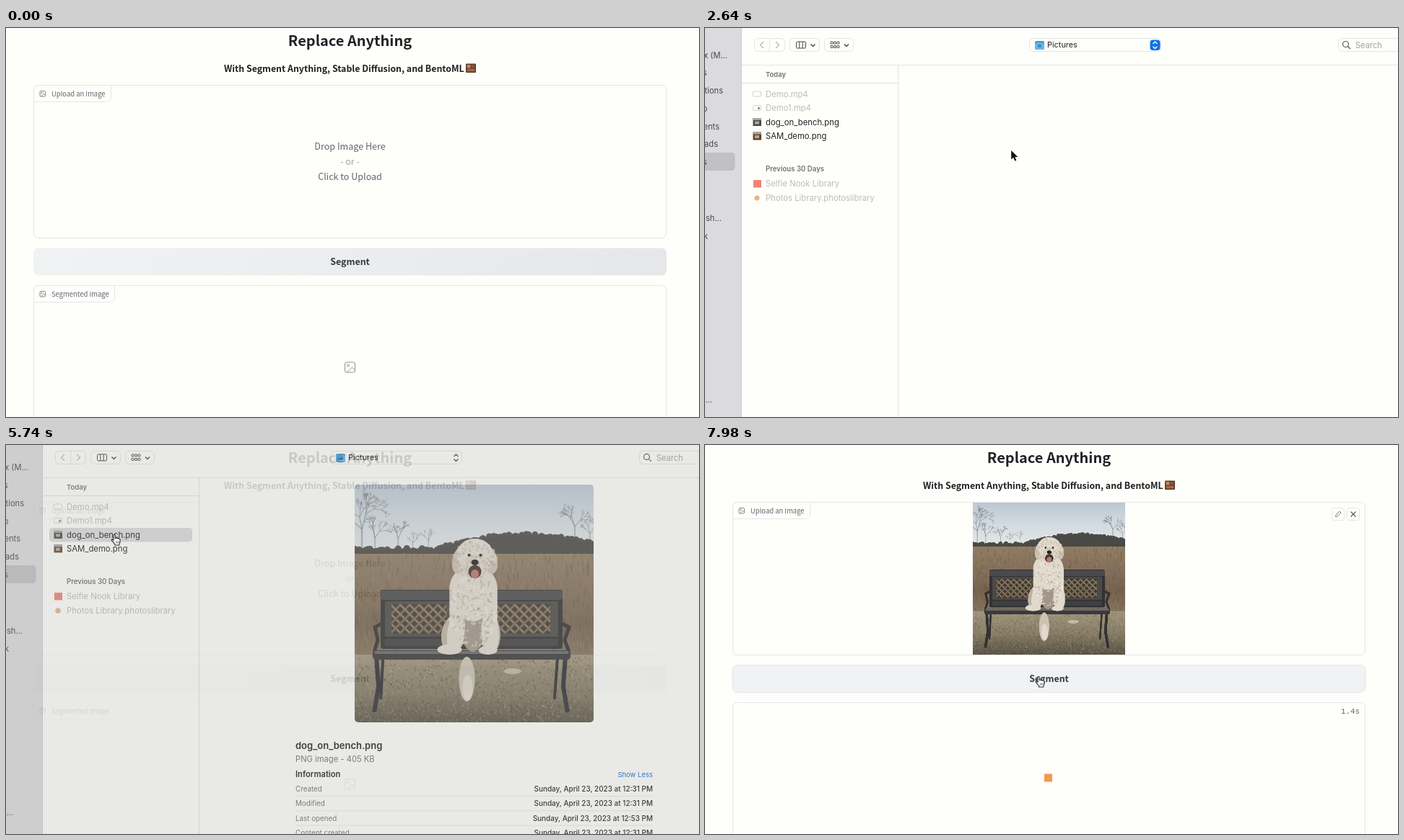
An HTML page with a canvas that plays this animation: 960 by 540 pixels, repeating every 8 s.

```html
<!DOCTYPE html>
<html lang="en">
<head>
<meta charset="utf-8">
<title>Replace Anything</title>
<style>
html, body { margin: 0; width: 100%; height: 100%; overflow: hidden; background: #fefefb; }
canvas { display: block; width: 960px; height: 540px; }
</style>
</head>
<body>
<canvas id="stage" width="960" height="540"></canvas>
<script>
const LOOP = 8000;
const BG = '#fefefb', INK = '#202226', MID = '#62666e', PALE = '#bcbcc0', LINE = '#e5e6e9', DARK = '#44464a';
const PAGE_FONT = '"Noto Sans CJK JP", "Noto Sans CJK SC", "Noto Sans CJK", "Noto Sans", sans-serif';
const UI_FONT = 'Inter, sans-serif';

const makeCanvas = (w, h) => Object.assign(document.createElement('canvas'), { width: w, height: h });
const stage = document.getElementById('stage').getContext('2d');
const layer = makeCanvas(960, 540);
const layerCtx = layer.getContext('2d');
let g = stage;

const clamp = v => Math.min(1, Math.max(0, v));
const ramp = (t, a, b) => clamp((t - a) / (b - a));
const ease = u => u * u * (3 - 2 * u);

function rect(x, y, w, h, color) {
  g.fillStyle = color;
  g.fillRect(x, y, w, h);
}

function box(x, y, w, h, r, fill, stroke) {
  g.beginPath();
  g.roundRect(x, y, w, h, r);
  if (fill) { g.fillStyle = fill; g.fill(); }
  if (stroke) { g.strokeStyle = stroke; g.lineWidth = 1; g.stroke(); }
}

function oval(x, y, rx, ry, color, turn = 0) {
  g.beginPath();
  g.ellipse(x, y, rx, ry, turn, 0, 7);
  g.fillStyle = color;
  g.fill();
}

function line(points, color, width = 1) {
  g.beginPath();
  for (let i = 0; i < points.length; i += 2) g.lineTo(points[i], points[i + 1]);
  g.strokeStyle = color;
  g.lineWidth = width;
  g.stroke();
}

// y is the middle of the capitals
function text(s, x, y, size, color, { align = 'left', weight = 400, font = UI_FONT } = {}) {
  g.font = `${weight} ${size}px ${font}`;
  g.textAlign = align;
  g.fillStyle = color;
  g.fillText(s, x, y + size * 0.365);
}

const label = (s, x, y, size, color, align = 'left', weight = 400) =>
  text(s, x, y, size, color, { align, weight, font: PAGE_FONT });

function gradient(x0, y0, x1, y1, ...colors) {
  const grad = g.createLinearGradient(x0, y0, x1, y1);
  colors.forEach((c, i) => grad.addColorStop(i / (colors.length - 1), c));
  return grad;
}

function seeded(seed) {
  return () => (seed = (seed * 16807) % 2147483647) / 2147483647;
}

/* ---------- photo ---------- */

function tree(x, y, angle, len, rnd) {
  if (len < 3) return;
  const x2 = x + Math.sin(angle) * len, y2 = y - Math.cos(angle) * len;
  line([x, y, x2, y2], 'rgba(92,92,90,.4)', len / 14 + 0.3);
  for (let i = -1; i <= 1; i++) tree(x2, y2, angle + i * 0.5 + (rnd() - 0.5) * 0.7, len * (0.55 + rnd() * 0.2), rnd);
}

function blades(n, top, height, tall, lean, colors, rnd) {
  for (let i = 0; i < n; i++) {
    const x = rnd() * 330, y = top + rnd() * height;
    line([x, y, x + (rnd() - 0.5) * lean, y - tall], colors[rnd() * colors.length | 0], 0.9);
  }
}

function lattice(x, y, w, h) {
  rect(x, y, w, h, '#3f3a34');
  g.save();
  g.beginPath();
  g.rect(x, y, w, h);
  g.clip();
  for (let i = -h; i < w + h; i += 13) {
    line([x + i, y, x + i + h, y + h], '#8b7860', 3);
    line([x + i + h, y, x + i, y + h], '#7a6852', 3);
  }
  g.restore();
}

function bench() {
  const dark = '#323234', wood = '#4a4a4c';
  line([30, 240, 33, 280, 27, 316], dark, 6);
  line([291, 240, 288, 280, 294, 316], dark, 6);
  line([39, 242, 36, 298], dark, 4);
  line([280, 242, 276, 298], dark, 4);
  box(36, 146, 251, 82, 3, dark);
  box(36, 147, 251, 13, 3, wood);
  rect(42, 162, 239, 49, '#4c4a47');
  lattice(51, 166, 76, 41);
  lattice(196, 166, 74, 41);
  rect(42, 214, 239, 10, '#404042');
  line([39, 192, 28, 198, 32, 216, 27, 232], dark, 5);
  line([284, 192, 296, 198, 290, 216, 296, 232], dark, 5);
  box(25, 230, 273, 13, 4, '#3a3a3c');
  rect(28, 231, 267, 4, '#68686a');
}

function dog(rnd) {
  const fur = '#e0d9cc', shade = '#bdb2a2';
  oval(155, 270, 11, 31, '#cdc4b4');
  oval(156, 282, 7, 18, fur);
  oval(137, 207, 17, 27, shade, 0.2);
  oval(186, 205, 15, 29, shade, -0.1);
  box(131, 112, 66, 112, 32, fur);
  oval(163, 190, 18, 42, '#a2978a');
  oval(163, 150, 28, 40, fur);
  oval(140, 205, 12, 29, fur, 0.15);
  oval(187, 205, 12, 29, fur, -0.08);
  oval(131, 229, 17, 7, fur);
  oval(184, 230, 13, 6, fur);
  oval(145, 105, 10, 19, '#cbc1b1', 0.2);
  oval(187, 105, 10, 19, '#cbc1b1', -0.2);
  oval(166, 97, 25, 22, fur);
  oval(166, 114, 18, 17, '#d8cfc1');
  for (let i = 0; i < 420; i++) {
    const a = rnd() * 7, r = Math.sqrt(rnd());
    const onHead = i % 4 === 0;
    const x = onHead ? 166 + Math.cos(a) * r * 30 : 163 + Math.cos(a) * r * 34;
    const y = onHead ? 101 + Math.sin(a) * r * 24 : 172 + Math.sin(a) * r * 54;
    oval(x, y, 2.4, 1.2, rnd() < 0.45 ? 'rgba(150,138,122,.3)' : 'rgba(242,238,228,.45)', rnd() * 3);
  }
  oval(158, 98, 2.2, 2, '#37302a');
  oval(174, 98, 2.2, 2, '#37302a');
  oval(166, 121, 9, 9, '#46342e');
  oval(166, 124, 5.5, 6, '#b8776e');
  oval(166, 108, 5, 4, '#222022');
}

function makePhoto() {
  const c = makeCanvas(660, 660), rnd = seeded(77);
  g = c.getContext('2d');
  g.scale(2, 2);
  rect(0, 0, 330, 110, gradient(0, 0, 0, 100, '#bcc8d2', '#d3dce2', '#e6e9e8'));
  [[10, 92, 30], [28, 92, 18], [102, 90, 12], [60, 92, 16], [80, 92, 11], [304, 78, 20], [325, 82, 14]]
    .forEach(([x, y, s]) => tree(x, y, 0, s, rnd));
  const ridge = x => 90 - 20 * Math.sin(clamp((x - 110) / 250) * Math.PI);
  for (let x = 0; x < 330; x += 3) oval(x, ridge(x) + rnd() * 5, 5, 6, '#4e4d48');
  g.beginPath();
  g.moveTo(0, 106);
  for (let x = 0; x <= 330; x += 10) g.lineTo(x, ridge(x));
  g.lineTo(330, 106);
  g.fillStyle = '#4a4945';
  g.fill();
  rect(0, 96, 330, 150, gradient(0, 96, 0, 240, '#8f7d64', '#84705a', '#75624e', '#85745c'));
  blades(800, 102, 137, 9, 4, ['rgba(72,56,42,.3)', 'rgba(174,150,120,.3)'], rnd);
  rect(0, 236, 330, 94, gradient(0, 236, 0, 330, '#a0957c', '#897f68', '#5b5446'));
  blades(1100, 238, 94, 3, 8, ['rgba(56,50,40,.4)', 'rgba(200,188,160,.4)'], rnd);
  oval(218, 259, 12, 4, '#c4b9a2');
  bench();
  dog(rnd);
  return c;
}
const photo = makePhoto();

/* ---------- web page ---------- */

function imageIcon(x, y, s, color) {
  box(x, y, s, s, s * 0.15, null, color);
  g.beginPath();
  g.arc(x + s * 0.32, y + s * 0.32, s * 0.11, 0, 7);
  g.stroke();
  line([x + s * 0.2, y + s, x + s * 0.7, y + s * 0.5, x + s, y + s * 0.76], color);
}

function tab(y, w, s) {
  box(38.5, y, w, 23, [6, 0, 6, 0], BG, LINE);
  imageIcon(47, y + 8, 7.5, '#84888f');
  label(s, 63, y + 11.8, 9.45, MID);
}

function bento() {
  box(637, 49.5, 14, 12.5, 1, '#56392a');
  rect(638.5, 51, 5, 4.5, '#c08a5c');
  rect(644.5, 51, 5, 4.5, '#84583a');
  rect(638.5, 56.5, 11, 4, '#9a6a42');
  oval(646.5, 58.5, 1.5, 1.3, '#d45a3c');
}

function page(t) {
  const loaded = t >= 6040, hover = t >= 7080, started = 7280;
  rect(0, 0, 960, 540, BG);
  label('Replace Anything', 476.5, 18, 20, INK, 'center', 600);
  label('With Segment Anything, Stable Diffusion, and BentoML', 302, 56, 12.35, INK, 'left', 600);
  bento();

  box(38.5, 79.5, 876, 212, 6, null, LINE);
  if (loaded) {
    g.drawImage(photo, 371, 80, 210.5, 210.5);
    box(868.5, 87.5, 17, 17, 3, BG, LINE);
    box(889.5, 87.5, 17, 17, 3, BG, LINE);
    line([873.5, 99.5, 874, 97, 879, 92, 881, 94, 876, 99, 873.5, 99.5], '#6f737a', 0.9);
    line([894.5, 92.5, 901.5, 99.5], '#54575d', 1.1);
    line([901.5, 92.5, 894.5, 99.5], '#54575d', 1.1);
  } else {
    label('Drop Image Here', 476.5, 164, 12.55, MID, 'center');
    label('- or -', 476.5, 185.5, 12.55, '#a0a4ab', 'center');
    label('Click to Upload', 476.5, 206.5, 12.55, MID, 'center');
  }
  tab(79.5, 107, 'Upload an Image');

  const fill = hover ? '#f1f2f3' : gradient(38, 305, 915, 343, '#f1f2f3', '#e5e7ea');
  box(38, 305.5, 877, 38, 7, fill, hover ? LINE : null);
  label('Segment', 476.5, 324, 12.45, '#363a42', 'center', 600);

  box(38.5, 357.5, 876, 220, 6, null, LINE);
  if (t < started) {
    tab(357.5, 112, 'Segmented Image');
    imageIcon(469.5, 464, 14, '#8e9299');
  } else {
    const secs = ((t - started) / 500).toFixed(1) + 's';
    text(secs, 907, 368.8, 10.8, MID, { align: 'right', font: '"Liberation Mono", monospace' });
    rect(470, 456.5, 11, 11, '#f09a4c');
  }
}

/* ---------- file dialog ---------- */

function chevron(x, y, w, h) {
  line([x - w, y - h, x, y, x + w, y - h], DARK, 1.4);
}

function toolbar(active) {
  const rim = '#e4e4e6';
  box(68.5, 14.5, 42, 18, 5, null, rim);
  line([89.5, 15, 89.5, 32], rim);
  line([81, 19, 76.5, 23.5, 81, 28], '#b4b4b8', 1.2);
  line([98, 19, 102.5, 23.5, 98, 28], '#b4b4b8', 1.2);
  box(117.5, 14.5, 41, 18, 5, null, rim);
  box(126.5, 19, 13, 9, 1.5, null, DARK);
  line([130.8, 19, 130.8, 28], DARK);
  line([135.2, 19, 135.2, 28], DARK);
  chevron(149.5, 25.5, 3, 3);
  box(165.5, 14.5, 40, 18, 5, null, rim);
  for (let i = 0; i < 3; i++) {
    for (let j = 0; j < 2; j++) box(174 + i * 4.5, 19 + j * 5.5, 3, 3, 0.5, null, DARK);
  }
  chevron(196, 25.5, 3, 3);

  box(449.5, 14.5, 182, 18, 5, null, rim);
  box(457, 18, 13, 12, 2, '#3f9bd4');
  box(457, 20.5, 13, 9.5, 2, '#62b8ea');
  box(461, 23, 5, 4, 1, '#3a8cc0');
  text('Pictures', 474, 23.5, 10.9, INK);
  if (active) box(616.5, 16.5, 14, 14.5, 4, '#0f72e6');
  const arrow = active ? '#ffffff' : DARK;
  line([620.5, 22, 623.5, 19, 626.5, 22], arrow, 1.4);
  line([620.5, 25.5, 623.5, 28.5, 626.5, 25.5], arrow, 1.4);

  box(877.5, 14.5, 110, 18, 5, null, rim);
  g.beginPath();
  g.arc(887.5, 22.5, 4, 0, 7);
  g.strokeStyle = '#55575b';
  g.lineWidth = 1.2;
  g.stroke();
  line([890.5, 25.5, 894, 29], '#55575b', 1.3);
  text('Search', 901, 24, 11.1, '#a0a0a5');
}

function sidebar() {
  rect(0, 0, 51, 546, '#dbdbdd');
  line([50.5, 0, 50.5, 546], '#cbcbce');
  box(-10, 173, 51.5, 25, 5, '#c1c1c4');
  [['x (M...', 31, 37.5], ['s', 2.5, 62], ['tions', 25, 87], ['o', 3.5, 112], ['ents', 20, 136.5], ['oads', 18, 161],
    ['s', 2.5, 186], ['osh...', 23, 264], ['k', 4, 289], ['...', 10, 516]]
    .forEach(([s, x, y]) => text(s, x, y, 11.1, '#48484c', { align: 'right' }));
}

function thumb(y, color) {
  rect(66.5, y - 5.5, 11.5, 11, color);
  rect(66.5, y - 5.5, 11.5, 3, '#a4a6a6');
  rect(69, y - 1, 6, 4, '#b8a48c');
}

function fileList(selected, active) {
  line([51, 76.5, 267, 76.5], '#e0e0e2');
  line([267.5, 52, 267.5, 546], '#e2e2e4');
  text('Today', 84, 64.5, 9.5, '#727276', { weight: 600 });
  text('Previous 30 Days', 84, 195.5, 9.65, '#727276', { weight: 600 });
  if (selected) box(60, 121, 198, 19.5, 4.5, active ? '#0a58d2' : '#dadadc');
  box(66.5, 88, 11, 7, 1, null, '#d4d4d8');
  box(66.5, 107.5, 11, 7, 1, null, '#d4d4d8');
  rect(73, 110, 3, 3, '#96969a');
  thumb(130.5, '#4a4a44');
  thumb(150, '#644430');
  rect(67, 211, 11, 10.5, '#ee8478');
  oval(72, 236, 3.6, 3.6, '#e8b488');
  const rows = [['Demo.mp4', 91.5, PALE], ['Demo1.mp4', 111, PALE],
    ['dog_on_bench.png', 130.5, selected && active ? '#ffffff' : INK], ['SAM_demo.png', 150, INK],
    ['Selfie Nook Library', 216, PALE], ['Photos Library.photoslibrary', 236, PALE]];
  rows.forEach(([s, y, color]) => text(s, 84, y, 11.3, color));
}

function preview() {
  g.save();
  g.beginPath();
  g.roundRect(483, 61, 331, 330, 5);
  g.clip();
  g.drawImage(photo, 483, 61, 331, 330);
  g.restore();
  text('dog_on_bench.png', 401, 423.5, 13, INK, { weight: 600 });
  text('PNG image - 405 KB', 401, 442, 11.2, '#727276');
  text('Information', 401, 463, 11.2, INK, { weight: 600 });
  text('Show Less', 896, 463.5, 9.5, '#1a6cc8', { align: 'right' });
  const day = 'Sunday, April 23, 2023 at ';
  [['Created', '12:31 PM'], ['Modified', '12:31 PM'], ['Last opened', '12:53 PM'], ['Content created', '12:31 PM']]
    .forEach(([name, hour], i) => {
      const y = 483.5 + i * 20.3;
      text(name, 401, y, 9.8, '#727276');
      text(day + hour, 896, y, 9.95, INK, { align: 'right', weight: 500 });
      line([401, y + 10, 896, y + 10], '#e8e8ea');
    });
}

function dialog(t, dy) {
  const active = t < 5640;
  rect(0, 0, 960, 540, BG);
  g.save();
  g.translate(0, dy);
  toolbar(active);
  line([51, 51.5, 960, 51.5], '#e4e4e6');
  sidebar();
  fileList(t >= 3640, active);
  if (t >= 3720) preview();
  g.restore();
}

/* ---------- pointer ---------- */

const hand = new Path2D('M4 9V2.2Q4 .8 5.1 .8T6.3 2.2V6Q7.5 5 8.6 6.2Q9.8 5.4 10.8 6.6Q12 6 13 7.4V10.5Q13 13 11.8 14.2V15.5H5.8V14.2Q3.5 11.5 1.6 9.2Q.8 7.6 2.2 7.4Q3.2 7.6 4 9Z');
const arrow = new Path2D('M0 0V12.4L2.9 9.8L5 14.6L7.1 13.7L5.1 9H9Z');

// start, end, target x, target y, bend
const moves = [
  [300, 900, 479, 166.5, 0],
  [2440, 3220, 147, 131, 34],
  [3340, 3500, 150, 124.5, 0],
  [6620, 7160, 462, 321.5, 0]
];

function pointerAt(t) {
  let x = 560, y = 570;
  for (const [a, b, tx, ty, bend] of moves) {
    const s = ease(ramp(t, a, b));
    x += (tx - x) * s;
    y += (ty - y) * s + 2 * s * (1 - s) * bend;
  }
  return [x, y];
}

function pointer(t) {
  const [x, y] = pointerAt(t);
  const isArrow = t > 1860 && t < 5660;
  g.save();
  g.lineJoin = 'round';
  if (isArrow) {
    g.translate(x, y);
    g.strokeStyle = '#ffffff';
    g.lineWidth = 2;
    g.stroke(arrow);
    g.fillStyle = '#101012';
    g.fill(arrow);
  } else {
    g.translate(x - 5, y - 1);
    g.fillStyle = '#ffffff';
    g.fill(hand);
    g.strokeStyle = '#2c2c30';
    g.lineWidth = 1.1;
    g.stroke(hand);
    for (const fx of [7.6, 9.3, 11]) line([fx, 10, fx, 13], '#56565a', 0.8);
  }
  g.restore();
}

/* ---------- timeline ---------- */

function draw(t) {
  // share of the page in the cross-fade with the dialog
  const p = t < 3000 ? 1 - ramp(t, 1700, 1900) : ramp(t, 5680, 5950);
  g = stage;
  if (p < 1) dialog(t, -27 * p);
  if (p === 1) page(t);
  else if (p > 0) {
    // the page behind the dialog is dimmed
    g = layerCtx;
    page(t);
    rect(0, 0, 960, 540, `rgba(0,0,0,${0.45 * (1 - p)})`);
    g = stage;
    g.globalAlpha = p;
    g.drawImage(layer, 0, 0);
    g.globalAlpha = 1;
  }
  pointer(t);
}

const began = performance.now();
function tick() {
  draw((performance.now() - began) % LOOP);
  requestAnimationFrame(tick);
}
tick();
</script>
</body>
</html>
```
